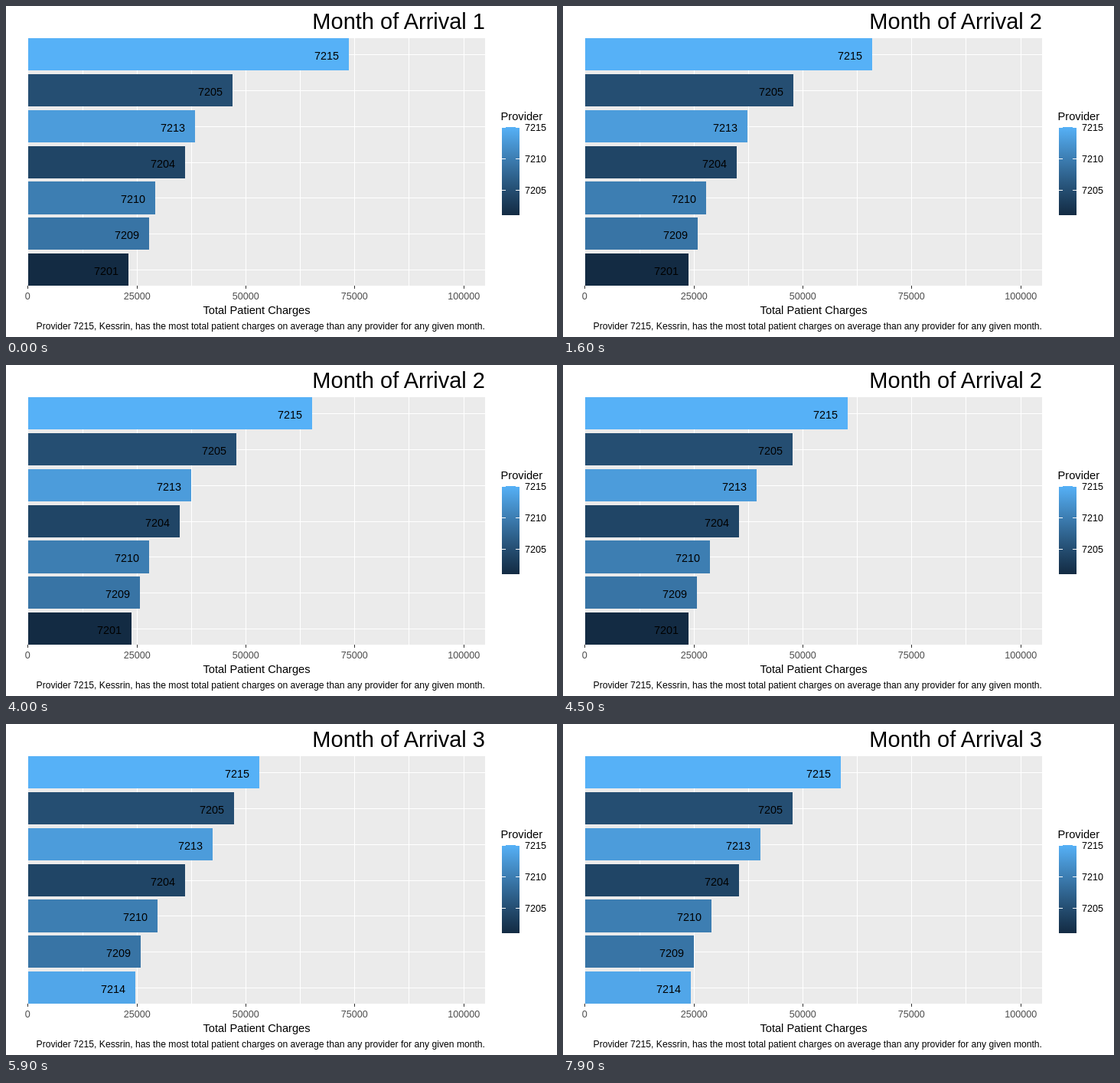
An HTML page for the animation above (8000 ms loop, 720 by 432 pixels).

```html
<!DOCTYPE html>
<html lang="en">
<head>
<meta charset="utf-8">
<title>Total Patient Charges</title>
<style>
  html, body { margin: 0; width: 100%; height: 100%; overflow: hidden; background: #fff; }
  svg { position: absolute; left: 0; top: 0; font-family: "Liberation Sans", Arial, sans-serif; }
  rect { shape-rendering: crispEdges; }
  .scale {
    position: absolute; left: 648px; top: 158px; width: 23px; height: 115px;
    background: linear-gradient(in lab, #56b1f7, #132b43);
  }
  .title { font-size: 29px; }
  .name { font-size: 14.67px; }
  .value { font-size: 14.4px; }
  .small { font-size: 12.59px; }
  .axis { fill: #4d4d4d; }
  .note { font-size: 12.15px; }
</style>
</head>
<body>
<div class="scale"></div>
<svg id="chart" width="720" height="432" viewBox="0 0 720 432"></svg>
<script>
const chart = document.getElementById("chart");

function add(tag, attrs, text) {
  const el = document.createElementNS("http://www.w3.org/2000/svg", tag);
  for (const key in attrs) el.setAttribute(key, attrs[key]);
  if (text !== undefined) el.textContent = text;
  return chart.appendChild(el);
}
const box = (x, y, width, height, fill) => add("rect", { x, y, width, height, fill });
const label = (text, x, y, cls, anchor = "start") =>
  add("text", { x, y, class: cls, "text-anchor": anchor }, text);

const LEFT = 29, TOP = 42, RIGHT = 626, BOTTOM = 365;
const rowTop = i => 42.2 + 46.8 * i;
const tickX = k => Math.round(28.4 + 142.3 * k);

// Panel and grid
box(LEFT, TOP, RIGHT - LEFT, BOTTOM - TOP, "#ebebeb");
for (let k = 0.5; k <= 4; k += 0.5) box(tickX(k), TOP, 1, BOTTOM - TOP, "#fff");
for (let i = 0; i < 7; i++) box(LEFT, Math.round(rowTop(i) + 21), RIGHT - LEFT, 1, "#fff");

// Axis
for (let k = 0; k <= 4; k++) {
  box(tickX(k), BOTTOM, 1, 4, "#333");
  label(k * 25000, tickX(k) + 0.3, 383, "small axis", "middle");
}
label("Total Patient Charges", 327.5, 402, "name", "middle");
label("Provider 7215, Kessrin, has the most total patient charges on average " +
  "than any provider for any given month.", RIGHT, 422, "note", "end");
const title = label("", RIGHT, 30, "title", "end");

// Legend
label("Provider", 646.5, 149, "name");
[7215, 7210, 7205].forEach((id, i) => {
  const y = Math.round(158 + 40.9 * i);
  box(648, y, 5, 1, "#fff");
  box(666, y, 5, 1, "#fff");
  label(id, 678, y + 5, "small");
});

// Provider, row, bar end in each month
const bars = [
  [7215, 0, [447.6, 401.6, 331.2, 407]],
  [7205, 1, [296, 301.4, 298, 303]],
  [7213, 2, [246.8, 241, 270, 241]],
  [7204, 3, [234.4, 227, 233.7, 224.5]],
  [7210, 4, [195, 187, 197.9, 188]],
  [7209, 5, [187, 175, 175.6, 164.5]],
  [7201, 6, [160, 164, 164, 164]],
  [7214, 6, [169, 169, 169, 164.4]]
].map(([id, row, ends]) => {
  const y = Math.round(rowTop(row));
  const share = (id - 7201) / 14 * 100;
  const rect = box(LEFT, y, 0, Math.round(rowTop(row) + 42.12) - y);
  rect.style.fill = `color-mix(in lab, #56b1f7 ${share}%, #132b43)`;
  return { id, ends, rect, text: label(id, 0, y + 28, "value", "end") };
});

const LOOP = 8000, STEP = 100, MOVE = 17, CYCLE = 34, LEAD = 3;
const ease = p => p < 0.5 ? 4 * p ** 3 : 1 - 4 * (1 - p) ** 3;

function draw(time) {
  const n = Math.floor(((time + 0.5) % LOOP) / STEP) - LEAD;
  const month = Math.max(0, Math.floor(n / CYCLE));
  const p = Math.min(1, Math.max(0, (n - month * CYCLE) / MOVE));
  const e = ease(p);
  const swapped = month + p >= 2;

  title.textContent = "Month of Arrival " + (month + (p < 0.5 ? 1 : 2));
  for (const { id, ends, rect, text } of bars) {
    const end = Math.round(ends[month] + (ends[month + 1] - ends[month]) * e);
    const hidden = id === (swapped ? 7201 : 7214);
    rect.setAttribute("width", end - LEFT);
    text.setAttribute("x", end - 13);
    rect.style.display = text.style.display = hidden ? "none" : "";
  }
}

function tick() {
  draw(performance.now());
  requestAnimationFrame(tick);
}
tick();
</script>
</body>
</html>
```
